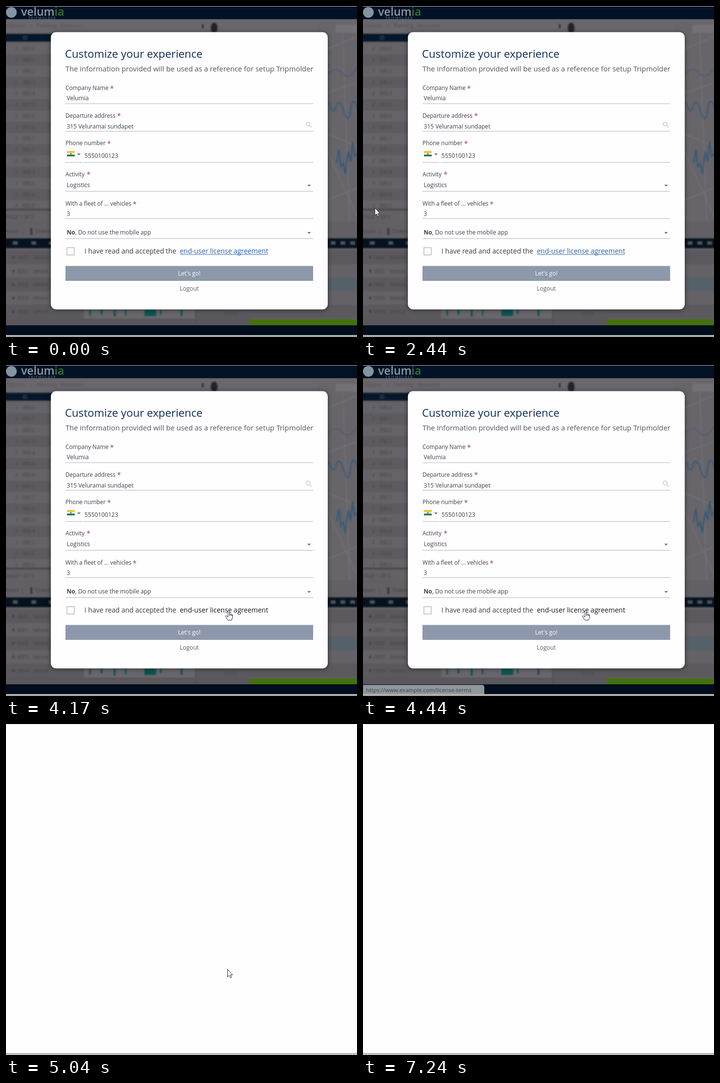
These frames come from a looping animation (720x678 px, 8 s). An HTML page:

```html
<!DOCTYPE html>
<html lang="en">
<head>
<meta charset="utf-8">
<title>Setup form</title>
<style>
html, body { margin: 0; width: 100%; height: 100%; overflow: hidden; background: #fefdff; }
svg { display: block; font-family: "Open Sans", sans-serif; }
text { white-space: pre; }
#backdrop { filter: blur(1.7px); }
#card { filter: drop-shadow(0 1px 5px rgba(0, 0, 0, .55)); }
.label { font-size: 11.75px; fill: #3f3f46; }
.value { font-size: 12.1px; fill: #3f3f46; }
.star { font-size: 14px; font-weight: 600; fill: #a8606c; }
.consent { font-size: 14px; fill: #3b3b42; }
.rule { stroke: #b4b3b9; }
.arrow { fill: #77767c; }
</style>
</head>
<body>
<svg width="720" height="678" viewBox="0 0 720 678">
  <g id="app">
    <rect width="720" height="678" fill="#636165"/>
    <g id="backdrop"></g>
    <rect width="720" height="27" fill="#021226"/>
    <circle cx="11" cy="13" r="11" fill="#8494a1"/>
    <text x="31" y="20" font-size="23" font-weight="600" fill="#8c9ba5">velum<tspan fill="#2f7434">ia</tspan></text>
    <text x="46" y="27" font-size="7" letter-spacing="1.4" fill="#67778a">TRIPMOLDER</text>
    <rect y="654" width="720" height="20" fill="#010d1c"/>

    <rect id="card" x="92" y="53.5" width="568" height="568" rx="11" fill="#fefdff"/>
    <text x="121" y="106" font-size="22.3" fill="#0d2c58">Customize your experience</text>
    <text x="122" y="134" font-size="14.8" fill="#55555c">The information provided will be used as a reference for setup Tripmolder</text>
    <g id="form"></g>

    <g stroke="#c6c5ca" stroke-width="1.5" fill="none">
      <circle cx="619.7" cy="241.7" r="4"/>
      <path d="M622.7 244.7l4.3 4.3"/>
    </g>
    <rect x="125" y="297" width="16" height="4" fill="#efc43a"/>
    <rect x="125" y="301" width="16" height="3.5" fill="#f4f3ee"/>
    <rect x="125" y="304.5" width="16" height="3.5" fill="#237a37"/>
    <circle cx="133" cy="302.8" r="1.5" fill="#4a5f9a"/>
    <path class="arrow" d="M146 302h7l-3.5 4z"/>
    <path class="arrow" d="M618 366h7.4l-3.7 4z"/>
    <path class="arrow" d="M618 463h7.4l-3.7 4z"/>
    <text class="value" x="124.5" y="468"><tspan font-weight="700">No</tspan>, Do not use the mobile app</text>

    <rect x="125" y="495" width="15" height="15" fill="#fff" stroke="#98979c"/>
    <text class="consent" x="161" y="507">I have read and accepted the</text>
    <text class="consent" id="link" x="356.5" y="507">end-user license agreement</text>
    <path id="underline" d="M357 509h180" stroke="#2a63a8"/>
    <rect x="122" y="532.5" width="508" height="30.5" fill="#8d98aa"/>
    <text class="value" x="376" y="552" text-anchor="middle" style="fill:#fff">Let's go!</text>
    <text class="value" x="376" y="583" text-anchor="middle" style="fill:#5a5a60">Logout</text>

    <g id="status">
      <path d="M0 655.5h244q4.500 0 4.500 4.500v16h-248.500z" fill="#f1f1f4" stroke="#b9b9be"/>
      <text x="6" y="670" font-size="11.500" fill="#5f6166">https://www.example.com/license-terms</text>
    </g>
  </g>
  <path id="topEdge" d="M0 .5h720"/>
  <path d="M0 675.8h720" stroke="#b8b3b5" stroke-width="3.600"/>
  <g id="cursor" stroke-linejoin="round">
    <path id="arrow" d="M.5.5v15.500l3.500-3.200 2.400 5.300 2.300-1-2.400-5.100h4.500z" fill="#fff" stroke="#26262c"/>
    <path id="hand" d="M-1.700 1.500q1.700-2 3.200 0v6.200q1.500-.8 2.500.6 1.500-.7 2.400.8 1.300 0 1.300 1.700v4.700l-2 5.200h-7.500l-4.700-7.200q-.8-2.200 1.300-1.900l3.500 2.900zM1.500 8v4M4 8.600v3.400M6.300 9.400v2.600" fill="#fff" stroke="#26262c"/>
    <path id="beam" d="M-3 .5h2.500l.5.5.5-.5h2.500M0 1v14M-3 15.500h2.500l.5-.5.5.5h2.500" fill="none" stroke="#26262c"/>
  </g>
</svg>
<script>
const $ = id => document.getElementById(id);
const rect = (x, y, w, h, fill) => `<rect x="${x}" y="${y}" width="${w}" height="${h}" fill="${fill}"/>`;
const text = (x, y, cls, str) => `<text x="${x}" y="${y}" class="${cls}">${str}</text>`;
const small = (x, y, fill, str) => `<text x="${x}" y="${y}" font-size="10" fill="${fill}">${str}</text>`;
const line = (d, color, width) => `<path d="${d}" fill="none" stroke="${color}" stroke-width="${width}"/>`;

function drawBackdrop() {
  let s = rect(-9, 27, 740, 28, '#69676b') + small(2, 44, '#525055', 'Options    |   Planning   Resources')
    + rect(-9, 57, 120, 16, '#07172a') + small(34, 69, '#59636f', 'ID');
  for (let i = 0; i < 15; i++) {
    const y = 87 + i * 23;
    s += rect(-9, y - 11, 120, 23, i % 2 ? '#5d5b5f' : '#656367')
      + small(20, y + 4, '#333137', '/') + small(34, y + 4, '#444247', '000.' + i % 7);
  }
  s += rect(-9, 415, 110, 4, '#4a484c') + small(0, 436, '#454348', 'PAGE 1 OF 5')
    + small(-3, 465, '#3f3d42', 'Hours  |') + rect(50, 455, 4, 14, '#37353a')
    + small(60, 465, '#3f3d42', 'Orders');

  // map
  s += rect(640, 36, 90, 405, '#676569') + rect(676, 38, 60, 17, '#737176')
    + line('M655 90L725 60M655 180L725 155M690 40L705 440M655 260L725 290M655 400L725 370M660 300L720 430', '#727075', 2)
    + line('M655 145Q675 120 690 138T725 118', '#515073', 1.500)
    + line('M663 198q8 30 14 8t16 10 14-4 18 6', '#35587a', 2.500)
    + line('M678 322l5-28 4 36 5-8 4 22 6-46 5 20 4-40 4 30 8-8', '#2f5878', 2.500)
    + '<ellipse cx="427" cy="45" rx="7" ry="11" fill="#242329"/>' + rect(402, 37, 3, 9, '#2c2a30');

  // lower table
  s += rect(-9, 441, 740, 34, '#626064') + small(-3, 465, '#3f3d42', 'Hours  |')
    + rect(50, 455, 4, 14, '#37353a') + small(60, 465, '#3f3d42', 'Orders')
    + rect(-9, 476, 740, 20, '#06131f');
  for (const x of [14, 52, 88, 666, 686, 706]) s += rect(x, 482, 10, 7, '#4c535c');
  for (let i = 0; i < 5; i++) {
    const y = 515 + i * 27.7;
    s += rect(-9, y - 14, 740, 28, i % 2 ? '#646266' : '#5b595d')
      + rect(13, y - 3, 4, 6, '#3f4238') + small(23, y + 4, '#424045', '000' + i)
      + small(55, y + 4, '#424045', 'Vehicle');
  }
  s += rect(660, 557, 70, 27, '#566069') + rect(160, 615, 230, 40, '#69676b')
    + rect(-9, 640, 509, 16, '#59575b') + rect(388, 615, 2, 40, '#504e52');
  for (const [x, w, h] of [[171, 3, 12], [194, 4, 10], [221, 4, 14], [244, 3, 12], [284, 24, 13], [316, 3, 10], [358, 4, 13]])
    s += rect(x, 622, w, h, '#0a5552');
  s += small(448, 635, '#4c4a4f', '00:00') + rect(500, 642, 230, 14, '#42700c');
  $('backdrop').innerHTML = s;
}

function drawForm() {
  // label, label baseline, star x, value, value x, value baseline, rule y
  const fields = [
    ['Company Name', 172, 213.5, 'Velumia', 124.5, 193, 200],
    ['Departure address', 228.5, 228, '315 Veluramai sundapet', 124.5, 250.5, 256.5],
    ['Phone number', 285, 207.5, '5550100123', 161, 310.5, 320.5],
    ['Activity', 348.5, 165.5, 'Logistics', 124.5, 371, 379.5],
    ['With a fleet of ... vehicles', 409, 260, '3', 124.5, 430, 435.5]
  ];
  let s = '';
  for (const [label, ly, sx, value, vx, vy, ry] of fields)
    s += text(122, ly, 'label', label) + text(sx, ly + 1.5, 'star', '*') + text(vx, vy, 'value', value)
      + `<path class="rule" d="${vx > 150 ? `M122 ${ry}h35m2 0` : `M122 ${ry}`}H630"/>`;
  $('form').innerHTML = s + '<path class="rule" d="M122 476.500H630"/>';
}

// pointer stops: time, x, y, shape
const stops = [
  [0, 0, 0, ''],
  [2440, 24, 413, 'arrow'], [2500, 33, 418, 'arrow'], [2570, 40, 422, 'arrow'],
  [2970, 180, 411, 'beam'], [3040, 342.5, 429, 'beam'],
  [3370, 368, 449, 'arrow'], [3440, 420, 492, 'arrow'], [3500, 476, 525, 'arrow'],
  [3570, 548, 527, 'arrow'], [3640, 596, 521, 'arrow'], [3700, 618, 513, 'arrow'],
  [3770, 608, 508, 'arrow'], [3840, 572, 505, 'arrow'], [3900, 528, 503, 'hand'],
  [3970, 490, 502, 'hand'], [4040, 468, 502, 'hand'], [4170, 457, 502, 'hand'],
  [4970, 454, 502, 'arrow'],
  [5770, 436, 478, 'arrow'], [5840, 408, 438, 'arrow'], [5900, 392, 414, 'arrow'],
  [7170, 280, 626, 'arrow'], [7240, 0, 0, '']
];

const show = (id, on) => $(id).setAttribute('visibility', on ? 'visible' : 'hidden');

function draw(now) {
  const t = now % 8000;
  const [, x, y, shape] = stops.findLast(stop => stop[0] <= t);
  $('cursor').setAttribute('transform', `translate(${x} ${y})`);
  for (const id of ['arrow', 'hand', 'beam']) show(id, id === shape);

  const hover = t >= 3900, blank = t >= 5040;
  $('app').style.display = blank ? 'none' : '';
  $('topEdge').setAttribute('stroke', blank ? '#e2e1e7' : '#bcc4d0');
  $('link').style.fill = hover ? '#18181d' : '#2a63a8';
  $('underline').style.display = hover ? 'none' : '';
  const fade = Math.floor((t - 4300) / 67 + 1) / 5;
  $('status').style.opacity = t < 4970 ? Math.max(0, Math.min(1, fade)) : 0;
  requestAnimationFrame(draw);
}

drawBackdrop();
drawForm();
const start = performance.now();
requestAnimationFrame(function first() { draw(0); });
const frame = draw;
draw = now => frame(Math.max(0, now - start));
</script>
</body>
</html>
```
